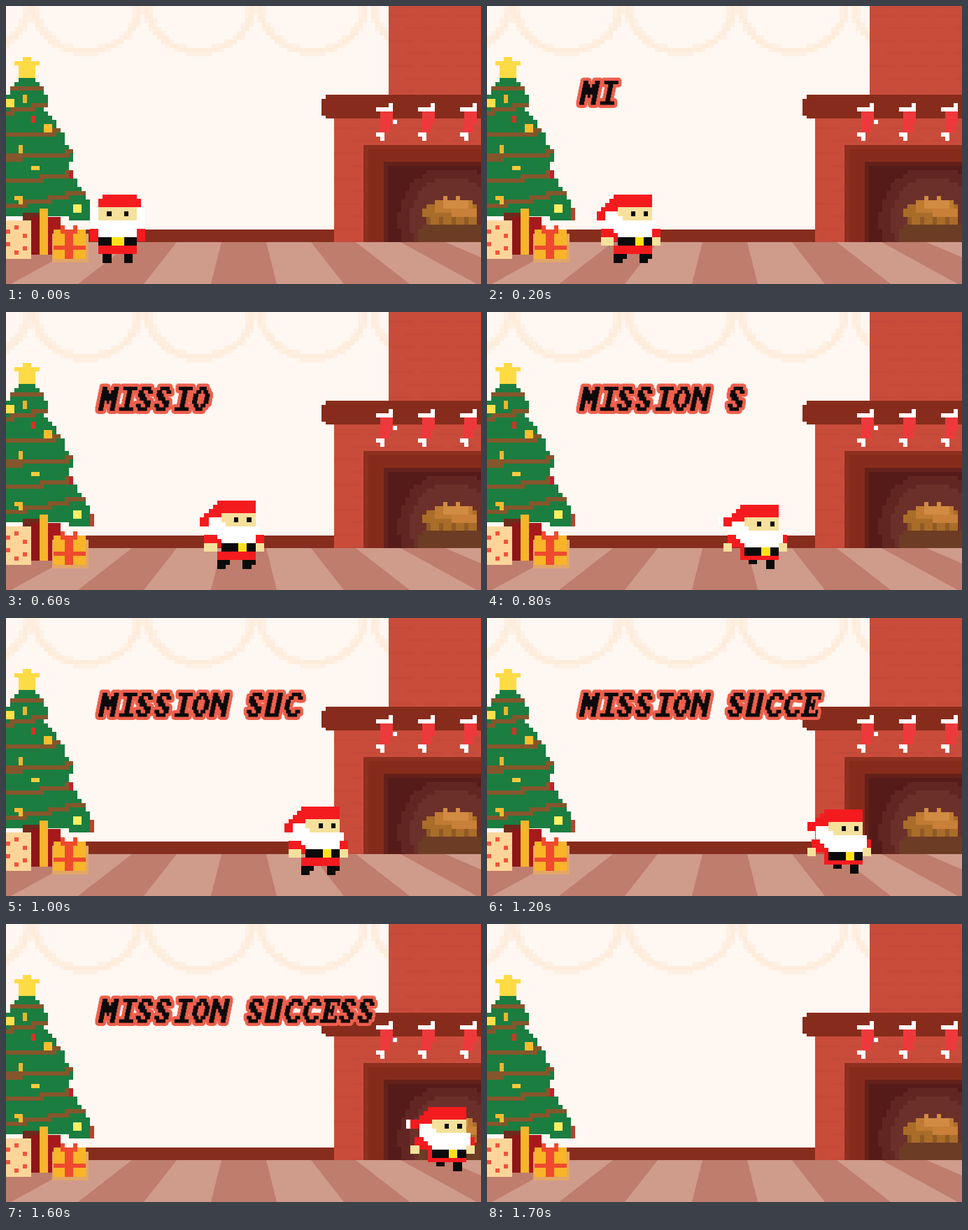
An HTML page with a canvas that plays this animation: 679 by 398 pixels, repeating every 1.9 s.

```html
<!DOCTYPE html>
<html lang="en">
<head>
<meta charset="utf-8">
<title>Mission success</title>
<style>
html, body { margin: 0; width: 100%; height: 100%; overflow: hidden; }
canvas { display: block; }
</style>
</head>
<body>
<canvas id="stage" width="679" height="398" aria-label="MISSION SUCCESS"></canvas>
<script>
const W = 679, H = 398, STEP = 100, STEPS = 19;
const ctx = document.getElementById('stage').getContext('2d');

const room = document.createElement('canvas');
room.width = W;
room.height = H;
const bg = room.getContext('2d');

// Filled box from corner to corner
function box(color, x0, y0, x1, y1) {
  bg.fillStyle = color;
  bg.fillRect(x0, y0, x1 - x0, y1 - y0);
}

// Fills every 6px cell whose centre passes the test
function cells(color, x0, y0, x1, y1, test) {
  for (let y = y0; y < y1; y += 6)
    for (let x = x0; x < x1; x += 6)
      if (test(x + 3, y + 3)) box(color, x, y, Math.min(x + 6, x1), Math.min(y + 6, y1));
}

function drawWall() {
  box('#fff7f1', 0, 0, W, H);
  for (const cx of [-44, 115, 277, 438, 600]) {
    const ring = (x, y) => Math.hypot((x - cx) / 80, y / 70);
    cells('#fef0e3', 0, 0, 547, 72, (x, y) => Math.abs(ring(x, y) - .93) < .08);
    cells('#feeddc', 0, 0, 547, 72, (x, y) => Math.abs(ring(x, y) - .94) < .04);
  }
  box('#872d1d', 0, 320, 469, 338);
}

function drawFloor() {
  box('#cf9b8b', 0, 338, W, H);
  bg.fillStyle = '#bf7d6d';
  for (let i = -4; i <= 4; i += 2) {
    const mid = 340 + i * 64, low = 340 + i * 95;
    bg.beginPath();
    bg.moveTo(mid - 32, 338);
    bg.lineTo(mid + 32, 338);
    bg.lineTo(low + 47, H);
    bg.lineTo(low - 47, H);
    bg.fill();
  }
}

function drawBricks(x0, y0, x1, y1) {
  box('#c94c3b', x0, y0, x1, y1);
  for (let y = y0 + 12, row = 0; y < y1; y += 18, row++)
    for (let x = x0 + (row % 2) * 24; x < x1; x += 48)
      box('#c54939', x, y, Math.min(x + 36, x1), Math.min(y + 4, y1));
}

function drawStocking(x) {
  box('#ee393c', x + 6, 151, x + 24, 169);
  box('#ee393c', x + 6, 169, x + 20, 181);
  box('#fff', x, 145, x + 24, 151);
  box('#fff', x + 18, 139, x + 24, 151);
  box('#fff', x, 181, x + 12, 187);
  box('#fff', x + 6, 187, x + 12, 193);
}

function drawFireplace() {
  drawBricks(547, 0, W, 127);
  drawBricks(469, 161, W, 338);
  box('#872c1c', 457, 127, W, 161);
  box('#872c1c', 451, 133, 457, 157);
  box('#8e2f1f', 511, 199, W, 338);
  box('#862b1b', 518, 205, W, 338);
  box('#64201a', 540, 223, W, 338);
  box('#551b18', 546, 229, W, 338);
  cells('#622622', 547, 235, W, 338, (x, y) => Math.hypot(x - 637, y - 306) < 76);
  cells('#6c302b', 547, 235, W, 338, (x, y) => Math.hypot(x - 637, y - 306) < 60);
  box('#6c3c24', 595, 313, W, 332);
  box('#6c3c24', 589, 319, W, 338);
  box('#a96d29', 595, 290, 673, 302);
  box('#a96d29', 601, 284, 673, 313);
  box('#bf7b32', 613, 278, 667, 296);
  box('#d28b42', 625, 272, 631, 290);
  box('#d28b42', 631, 278, 661, 290);
  box('#d28b42', 643, 272, 649, 290);
  box('#c98039', 637, 290, 673, 302);
  for (let x = 601; x < 670; x += 18) box('#8f5a24', x, 302, x + 6, 313);
  [529, 589, 649].forEach(drawStocking);
  box('#fff', 553, 163, 559, 169);
}

function drawTree() {
  const right = [42, 48, 54, 54, 60, 60, 60, 54, 60, 66, 72, 72, 78, 84, 84, 84, 90, 96,
    96, 96, 90, 90, 96, 96, 102, 102, 108, 114, 114, 120, 120, 126, 126, 120];
  const inside = (x, y) => {
    const row = Math.floor((y - 103) / 6);
    return x < right[row] && x > 18 - row * 5 && (y < 301 || x > 90);
  };
  const strand = (y0, slope) => cells('#85562c', 0, 103, 126, 307, (x, y) =>
    inside(x, y) && Math.abs(y - (y0 + slope * x + 2 * Math.sin(x / 32))) < 3.5);
  cells('#1b7d40', 0, 103, 126, 307, inside);
  strand(118, -.05);
  strand(153, -.25);
  strand(184, -.07);
  strand(217, -.08);
  strand(252, -.14);
  strand(286, -.18);

  box('#fddb45', 24, 73, 36, 103);
  box('#fddb45', 12, 79, 48, 85);
  box('#fddb45', 18, 85, 42, 103);
  box('#fde04a', 0, 133, 12, 145);
  box('#e9b52f', 24, 127, 30, 139);
  box('#cf3527', 36, 157, 42, 167);
  box('#fbbd2e', 54, 169, 66, 181);
  box('#f0b52f', 18, 199, 24, 211);
  box('#f8cc3d', 36, 229, 48, 235);
  box('#c3202b', 90, 236, 96, 247);
  box('#f5bc2f', 12, 272, 24, 278);
  box('#f5bc2f', 18, 278, 24, 284);
  box('#fdef62', 96, 284, 108, 296);
  box('#b5452f', 120, 289, 126, 307);
}

function drawGifts() {
  box('#6e2a1c', 24, 296, 48, 308);
  box('#a8191c', 36, 302, 78, 356);
  box('#8f1518', 36, 302, 48, 356);
  box('#f6b52a', 48, 290, 60, 356);
  box('#fdd59a', 0, 307, 36, 362);
  for (const [x, y] of [[12, 314], [0, 320], [24, 326], [0, 338], [12, 350], [24, 344]])
    box('#f0543c', x, y, x + 6, y + 6);
  box('#e3a668', 66, 326, 118, 367);
  box('#f9b428', 68, 320, 114, 362);
  box('#ef4a2e', 84, 326, 96, 362);
  box('#ef4a2e', 68, 343, 114, 349);
  box('#ef4a2e', 78, 314, 84, 320);
  box('#ef4a2e', 96, 314, 102, 320);
  box('#ef4a2e', 78, 320, 102, 326);
}

drawWall();
drawFloor();
drawFireplace();
drawTree();
drawGifts();

const INK = { R: '#f41b1f', W: '#fff', S: '#f5e19c', K: '#0b0b0b', Y: '#fee01a' };
const rows = text => text.trim().split(/\s+/);

const FRONT = rows(`
...RRRRRRRR..
..RRRRRRRRRR.
..RRRRRRRRRR.
WWSSSSSSSSSWW
WWSSKSSSKSSWW
WWSSSSSSSSSWW
WWWWWWWWWWWWW
WWWWWWWWWWWWW
RRWWWWWWWWWRR
RRWWWWWWWWWRR
RRKKKYYYKKKRR
..KKKYYYKKK..
..RRRRRRRRR..
..RRRRRRRRR..
...KK...KK...
...KK...KK...`);

const STRIDE = rows(`
.....RRRRRRRRR..
....RRRRRRRRRR..
...RRRRRRRRRRR..
WRRRRRSSSSSSSS..
WRRWWWSSSKSSKS..
...WWWWSSSSSSS..
...WWWWWWWWWWWW.
..RRWWWWWWWWWWWR
..RRRWWWWWWWWWWR
.SSRRRWWWWWWWWSS
.SS..RKKKKYYKKSS
.....RKKKKYYKK..
.....RRRRRRRRR..
.......KK..KK...
...........KK...`);

const STAND = rows(`
.....RRRRRRRRR..
....RRRRRRRRRR..
...RRRRRRRRRRR..
..RRRRSSSSSSSS..
.RRWWWSSSKSSKS..
.RRWWWWSSSSSSS..
...WWWWWWWWWWWW.
...WWWWWWWWWWWW.
..RRRWWWWWWWWWRR
..RRRRWWWWWWWWRR
..SSSRKKKKYYKKSS
..SSS.KKKKYYKKSS
.....RRRRRRRRR..
.....RRRRRRRRR..
.....KKK...KKK..
.....KK....KK...`);

function drawSprite(sprite, left, top) {
  const size = 6.1, at = (origin, i) => Math.round(origin + i * size);
  sprite.forEach((row, j) => [...row].forEach((ch, i) => {
    if (ch === '.') return;
    const x = at(left, i), y = at(top, j);
    ctx.fillStyle = INK[ch];
    ctx.fillRect(x, y, at(left, i + 1) - x, at(top, j + 1) - y);
  }));
}

function drawSanta(k) {
  if (k === 0) return drawSprite(FRONT, 120, 270);
  const x = 211 + 30.1 * (k - 4), lift = Math.max(0, 3 * k - 34);
  if (k & 2) drawSprite(STAND, x, 270 - lift);
  else drawSprite(STRIDE, x, 276 - lift);
}

const GLYPHS = {
  M: rows('##...## ###.### ####### ####### ##.#.## ##...## ##...##'),
  I: rows('.###### ...##.. ...##.. ...##.. ...##.. ...##.. .######'),
  S: rows('.####. ##..## ###... .###.. ...### ##..## .####.'),
  O: rows('..###.. .##.##. ##...## ##...## ##...## .##.##. ..###..'),
  N: rows('##...## ###..## ####.## ##.#### ##..### ##...## ##...##'),
  U: rows('##..## ##..## ##..## ##..## ##..## ##..## ######'),
  C: rows('..####. .##..## ##..... ##..... ##..... .##..## ..####.'),
  E: rows('####### .##...# .##.#.. .####.. .##.#.. .##...# #######')
};

function drawTitle(count) {
  const path = new Path2D();
  let x = 132;
  for (const ch of 'MISSION SUCCESS') {
    if (ch !== ' ') {
      if (count-- <= 0) break;
      GLYPHS[ch].forEach((row, j) => [...row].forEach((dot, i) => {
        if (dot === '#') path.rect(x + i * 3.3 + 6 - j, 107 + j * 4.9, 3.6, 5);
      }));
    }
    x += 26.4;
  }
  ctx.lineJoin = 'round';
  ctx.lineWidth = 9;
  ctx.strokeStyle = '#ee5f4c';
  ctx.stroke(path);
  ctx.fillStyle = '#0d0a0b';
  ctx.fill(path);
}

function frame() {
  const k = Math.floor(performance.now() / STEP) % STEPS;
  ctx.drawImage(room, 0, 0);
  if (k < 17) {
    drawTitle(k);
    drawSanta(k);
  }
  requestAnimationFrame(frame);
}
frame();
</script>
</body>
</html>
```
